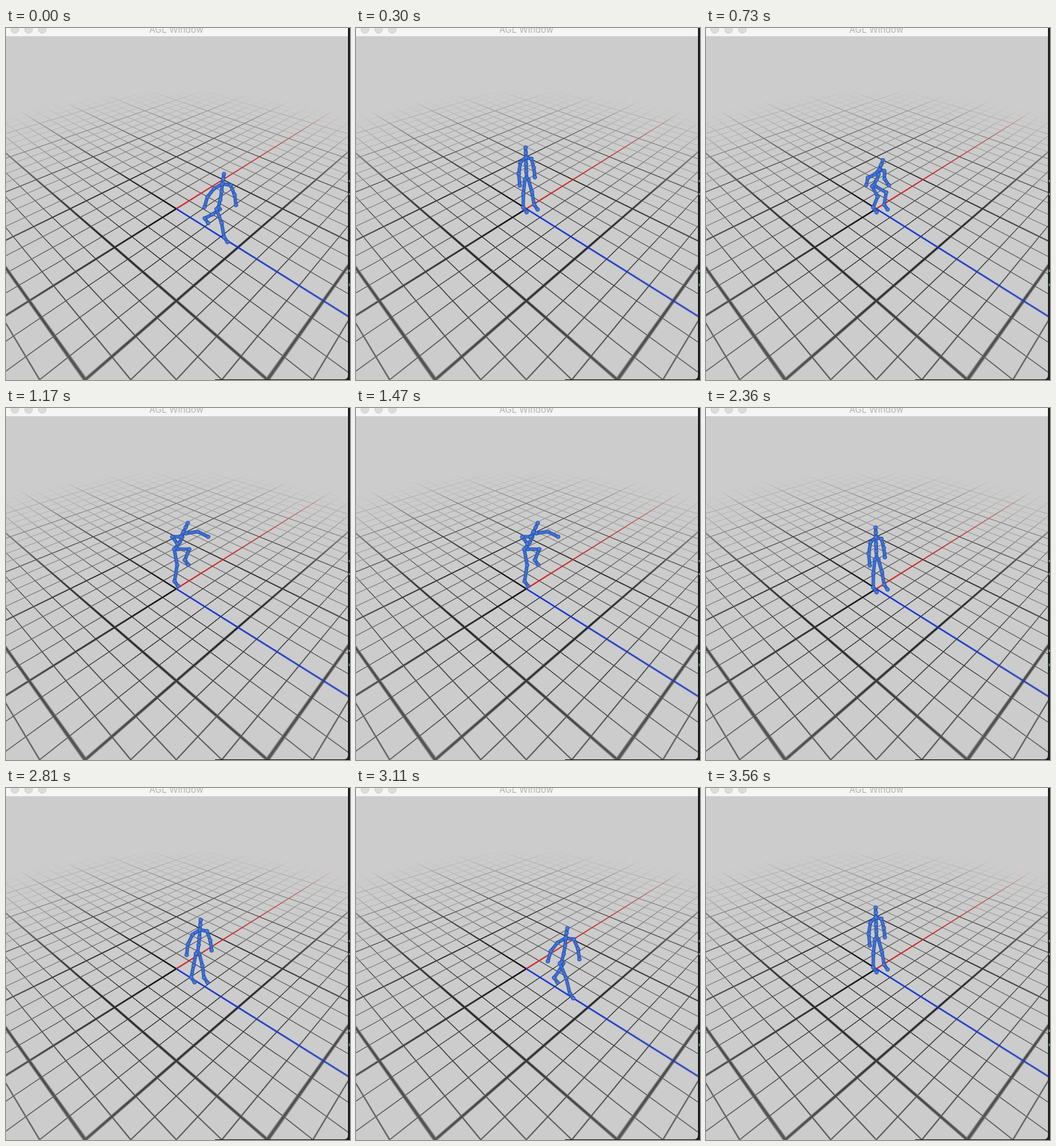
An HTML page with a canvas that plays this animation: 502 px wide and 514 px high, repeating every 3.66 s.

```html
<!DOCTYPE html>
<html lang="en">
<head>
<meta charset="utf-8">
<title>Walking figure</title>
<style>
  html, body { margin: 0; width: 100%; height: 100%; overflow: hidden; background: #ccc; }
  canvas { position: absolute; left: 0; top: 0; }
</style>
</head>
<body>
<canvas id="scene" width="502" height="514"></canvas>
<canvas id="figure" width="502" height="514"></canvas>
<script>
const W = 502, H = 514, LOOP = 3660;
const scene = document.getElementById('scene').getContext('2d');
const figure = document.getElementById('figure').getContext('2d');
const clamp = v => Math.max(0, Math.min(1, v));
const smooth = u => u * u * (3 - 2 * u);
const easeOut = u => 1 - Math.pow(1 - u, 1.8);

// Ground plane: horizon above the stage, origin at (248.5, 264).
const CX = 248.5, HORIZON = -85, DROP = 349, SPREAD = 77.5, TILT = 0.139;
const MAJOR = 0.021, MINOR = 0.0085, RADIUS = 5;

// Soft line at every multiple of step, never narrower than a pixel of size px.
function line(v, step, half, px) {
  const d = Math.abs(v - Math.round(v / step) * step);
  const edge = clamp((d / Math.max(half, px) - 0.2) / 0.8);
  return (1 - smooth(edge)) * Math.min(1, half / px);
}

function drawGround() {
  const image = scene.createImageData(W, H);
  for (let y = 0, i = 0; y < H; y++) {
    const s = (y + 0.5 - HORIZON) / DROP;
    const t = (1 - 1 / s) / TILT;
    const dt = 1 / (TILT * s * s * DROP);
    for (let x = 0; x < W; x++, i += 4) {
      const r = (x + 0.5 - CX) / (SPREAD * s);
      const a = (r - t) / 2, b = (r + t) / 2;
      const rx = 1 / (SPREAD * s) / 2, ry = -r / (s * DROP) / 2;
      const pxA = Math.hypot(rx, ry - dt / 2), pxB = Math.hypot(rx, ry + dt / 2);
      const fade = 1 - Math.pow(clamp(Math.hypot(a, b) / RADIUS), 1.15);
      const rgb = [204, 204, 204];
      const blend = (color, amount) => {
        for (let c = 0; c < 3; c++) rgb[c] += (color[c] - rgb[c]) * amount;
      };
      const majorA = line(a, 1, MAJOR, pxA), majorB = line(b, 1, MAJOR, pxB);
      const minor = Math.max(line(a, 0.25, MINOR, pxA) * (MINOR < pxA ? 1 : 0.9),
                             line(b, 0.25, MINOR, pxB) * (MINOR < pxB ? 1 : 0.9));
      const red = a > 0 && Math.abs(b) < 0.1, blue = b > 0 && Math.abs(a) < 0.1;
      blend([8, 8, 8], Math.max(minor, red ? 0 : majorB, blue ? 0 : majorA) * fade);
      if (red) blend([214, 40, 40], majorB * fade);
      if (blue) blend([15, 50, 215], majorA * fade);
      image.data.set([...rgb, 255], i);
    }
  }
  scene.putImageData(image, 0, 0);
}

function drawWindow() {
  const rect = (color, x, y, w, h) => {
    scene.fillStyle = color;
    scene.fillRect(x, y, w, h);
  };
  rect('#f5f5f5', 0, 0, 499, 12);
  for (let x = 13; x < 60; x += 20) {
    scene.beginPath();
    scene.arc(x, 2, 5.7, 0, 7);
    scene.fillStyle = '#dcdcdc';
    scene.fill();
    scene.strokeStyle = '#c9c9c9';
    scene.lineWidth = 0.8;
    scene.stroke();
  }
  scene.font = '13px Inter, "Liberation Sans", sans-serif';
  scene.textAlign = 'center';
  scene.fillStyle = '#b3b3b3';
  scene.fillText('AGL Window', 248.5, 7);

  rect('#1f1f22', 499, 0, 3, H);
  rect('#1f1f22', 305, 513, 197, 1);
  scene.beginPath();
  scene.moveTo(499, 507);
  scene.quadraticCurveTo(499, 513, 493, 513);
  scene.lineTo(499, 513);
  scene.fill();
  for (const y of [222, 241, 353]) rect('#77777a', 500, y, 2, 3);
  rect('#3f7d62', 500, 373, 2, 4);
}

// Limbs are the end point and the sideways bend of the middle joint.
const stand = {
  pelvis: [249, 219], neck: [248, 189], width: [8],
  nearArm: [239, 230, -2], farArm: [261, 218, 1],
  nearLeg: [244, 262, -1], farLeg: [260, 258, 1]
};
const crouch = {
  pelvis: [244, 231], neck: [254, 210], width: [7],
  nearArm: [233, 229, -5], farArm: [268, 232, -4],
  nearLeg: [244, 262, 9], farLeg: [260, 258, 12]
};
const kick = {
  pelvis: [248, 204], neck: [259, 181], width: [4],
  nearArm: [250, 198, -11], farArm: [295, 188, 5],
  nearLeg: [246, 253, 4], farLeg: [261, 222, 14]
};
const dip = {
  ...stand, pelvis: [250, 221], neck: [258, 196], width: [4],
  nearArm: [253, 228, -2], farArm: [263, 223, -2],
  nearLeg: [244, 262, 6], farLeg: [260, 258, 7]
};
const stride = {
  pelvis: [300, 254], neck: [306, 219], width: [12],
  nearArm: [280, 253, -3], farArm: [326, 250, 2],
  nearLeg: [312, 300, 2], farLeg: [289, 277, 1]
};

// The body moves on over the planted far foot while the near foot swings.
const advance = (pose, dx, dy) => Object.fromEntries(
  Object.entries(pose).map(([part, [x, y, bend]]) => {
    const share = { width: 0, farLeg: 0.1, nearLeg: 0.65 }[part] ?? 1;
    return [part, [x + dx * share, y + dy * share, bend]];
  }));

// The far foot steps first, then the near one.
const walk = (u, part) =>
  part === 'farLeg' ? clamp(u * 2.2) : part === 'nearLeg' ? clamp((u - 0.35) / 0.65) : u;

const KEYS = [
  { at: 2, pose: stand },
  { at: 6, pose: crouch, ease: smooth },
  { at: 8, pose: kick, ease: easeOut },
  { at: 10, pose: kick, ease: smooth },
  { at: 12, pose: dip, ease: easeOut },
  { at: 16, pose: stand, ease: easeOut },
  { at: 21, pose: stride, ease: walk },
  { at: 23, pose: advance(stride, 13.5, 12), ease: easeOut },
  { at: 24, pose: stand, ease: smooth }
];

const between = (p, q, k) => p.map((v, i) => v + (q[i] - v) * k);
const offset = ([x, y], dx, dy) => [x + dx, y + dy];

function poseAt(beat) {
  const n = Math.max(1, KEYS.findIndex(key => key.at >= beat));
  const from = KEYS[n - 1], to = KEYS[n];
  const u = (beat - from.at) / (to.at - from.at);
  const pose = {};
  for (const part in stand) pose[part] = between(from.pose[part], to.pose[part], to.ease(u, part));
  return pose;
}

function limb(start, [x, y, bend]) {
  const dx = x - start[0], dy = y - start[1], length = Math.hypot(dx, dy);
  const middle = offset(start, dx / 2 + dy / length * bend, dy / 2 - dx / length * bend);
  return [start, middle, [x, y]];
}

function drawBone(p, q) {
  figure.lineCap = 'round';
  for (const [color, width] of [['#26499a', 5], ['#3c70d6', 3.4]]) {
    figure.beginPath();
    figure.moveTo(...p);
    figure.lineTo(...q);
    figure.strokeStyle = color;
    figure.lineWidth = width;
    figure.stroke();
  }
}

function drawJoint([x, y]) {
  figure.beginPath();
  figure.arc(x, y, 2.8, 0, 7);
  figure.fillStyle = '#447ae2';
  figure.fill();
  figure.strokeStyle = '#284e9f';
  figure.lineWidth = 0.8;
  figure.stroke();
}

function drawChain(points) {
  for (let i = 1; i < points.length; i++) drawBone(points[i - 1], points[i]);
  points.forEach(drawJoint);
}

function drawFigure({ pelvis, neck, width: [width], nearArm, farArm, nearLeg, farLeg }) {
  const dx = neck[0] - pelvis[0], dy = neck[1] - pelvis[1];
  const headScale = 14.5 / Math.hypot(dx, dy);
  const head = offset(neck, dx * headScale, dy * headScale);
  const spine = [0.33, 0.67].map(k => offset(between(neck, pelvis, k), dx / 6, 0));
  const leg = (side, end) => [...limb(offset(pelvis, 2.5 * side, 2), end), offset(end, 5, 7)];
  figure.clearRect(0, 0, W, H);
  drawChain([pelvis, ...leg(1, farLeg)]);
  drawChain([neck, ...limb(offset(neck, width, 2), farArm)]);
  drawChain([head, between(head, neck, 0.5), neck, ...spine, pelvis]);
  drawChain([pelvis, ...leg(-1, nearLeg)]);
  drawChain([neck, ...limb(offset(neck, -width, 7), nearArm)]);
}

drawGround();
drawWindow();

// The pose is held for one beat; the loop opens with the last two beats of the walk.
const BEAT = 148, LEAD = 16;
let shown = -1;
function tick() {
  const beat = Math.floor((performance.now() % LOOP + LEAD) / BEAT);
  if (beat !== shown) drawFigure(poseAt(beat < 2 ? beat + 22 : beat));
  shown = beat;
  requestAnimationFrame(tick);
}
tick();
</script>
</body>
</html>
```
